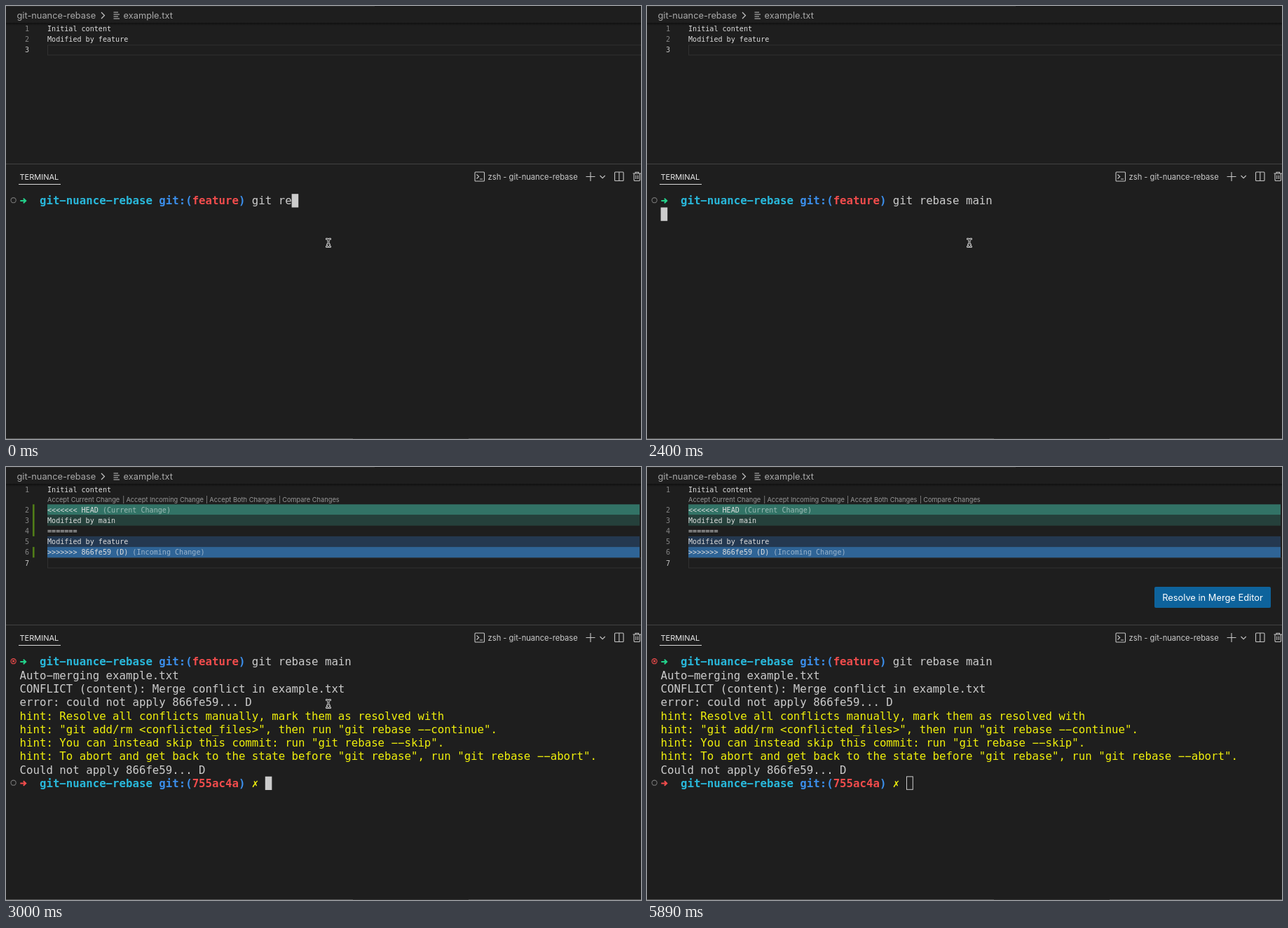
Write an HTML page that moves like this. It is 906 px wide and 618 px high and loops after 5.91 s.

```html
<!DOCTYPE html>
<html lang="en">
<head>
<meta charset="utf-8">
<title>Rebase conflict</title>
<style>
  html, body { margin: 0; width: 100%; height: 100%; overflow: hidden; background: #1e1e1e; }
  svg { display: block; width: 906px; height: 618px; }
  text { white-space: pre; }
  .ui { font-family: Inter, "Liberation Sans", sans-serif; }
  .code { font: 10.08px "DejaVu Sans Mono", monospace; fill: #dcdcdc; }
  .term { font: 15.72px "DejaVu Sans Mono", monospace; fill: #cccccc; }
  .bold { font-weight: bold; }
  .line { fill: none; stroke: #c5c5c5; }
</style>
</head>
<body>
<svg id="stage" viewBox="0 0 906 618">
  <defs>
    <linearGradient id="shade" x2="0" y2="1">
      <stop offset="0" stop-color="#101010"/>
      <stop offset="1" stop-color="#1e1e1e"/>
    </linearGradient>
  </defs>
  <rect width="906" height="618" fill="#1e1e1e"/>
  <rect width="526" height="1" fill="#2b2b2b"/>
  <rect x="526" width="380" height="1" fill="#191919"/>
  <rect y="24" width="906" height="4" fill="url(#shade)"/>

  <g class="ui" font-size="12.8" fill="#a9a9a9">
    <text x="15.5" y="17.8">git-nuance-rebase</text>
    <text x="167.6" y="17.8">example.txt</text>
  </g>
  <path class="line" d="M136 9l4.5 4.5l-4.5 4.5" stroke-width="1.2"/>
  <path class="line" d="M153.5 9h6.5M153.5 12h8.5M153.5 15h6.5M153.5 18h8.5" stroke-width="1.2"/>

  <g id="editor"></g>

  <g id="button">
    <rect x="724" y="171" width="166" height="30" rx="2" fill="#0e639c"/>
    <text class="ui" x="807" y="190.7" font-size="12.85" fill="#fff" text-anchor="middle">Resolve in Merge Editor</text>
  </g>

  <rect y="225" width="906" height="1" fill="#424242"/>
  <text class="ui" x="19.5" y="247.8" font-size="11" fill="#e7e7e7">TERMINAL</text>
  <rect x="18" y="254" width="60" height="1" fill="#d8d8d8"/>
  <text class="ui" x="687.6" y="247.8" font-size="11.15" fill="#cccccc">zsh - git-nuance-rebase</text>
  <g class="line" stroke-width="1.1">
    <rect x="669" y="237" width="13.5" height="13" rx="1"/>
    <path d="M671.5 240.5l3.2 3l-3.2 3M676 247h4"/>
    <path d="M827.5 243.5h13M834 237v13"/>
    <path d="M847.5 242l3.6 3.6l3.6-3.6"/>
    <rect x="868.5" y="237" width="12.5" height="12.5" rx="1"/>
    <path d="M874.8 237v12.5"/>
    <path d="M894.5 239h11.5M898 239v-1.8h4.5v1.8M896 239v9.2q0 1.3 1.3 1.3h5.8q1.3 0 1.3-1.3v-9.2M898.8 241.5v5.5M901.6 241.5v5.5"/>
  </g>

  <g id="terminal"></g>

  <path d="M0 617.5H495M660 617.5H906" stroke="#555"/>
  <path d="M495 617.5H660" stroke="#333"/>

  <g id="mouse" fill="none" stroke-linecap="round">
    <path id="beam" d="M-2.6 -5.5Q0 -5.5 0 -3.5V3.5Q0 5.5 -2.6 5.5M2.6 -5.5Q0 -5.5 0 -3.5M0 3.5Q0 5.5 2.6 5.5M-1.5 2.6H1.5" stroke="#d6d6d6" stroke-width="2.6"/>
    <use href="#beam"/>
    <path d="M-2.6 -5.5Q0 -5.5 0 -3.5V3.5Q0 5.5 -2.6 5.5M2.6 -5.5Q0 -5.5 0 -3.5M0 3.5Q0 5.5 2.6 5.5M-1.5 2.6H1.5" stroke="#161616" stroke-width="0.9"/>
  </g>
</svg>

<script>
const LOOP = 5910;
const COL = 9.464, ROW = 19.28, LEFT = 19.6, TOP = 268.2;
const EDIT_ROW = 15.2, LENS = 13.3;
const CYAN = '#29b8db', BLUE = '#3b8eea', RED = '#f14c4c', GREEN = '#23d18b', YELLOW = '#f0f00c';

const $ = id => document.getElementById(id);

function add(parent, tag, attrs, content) {
  const el = document.createElementNS('http://www.w3.org/2000/svg', tag);
  for (const key in attrs) el.setAttribute(key, attrs[key]);
  if (content) el.textContent = content;
  return parent.appendChild(el);
}
const show = (el, on) => el.setAttribute('visibility', on ? 'visible' : 'hidden');
const box = (parent, x, y, width, height, fill) => add(parent, 'rect', { x, y, width, height, fill });

// Editor
function editorLine(parent, index, y, text, note, active) {
  add(parent, 'text', {
    class: 'code', x: 33.2, y: y + 3.7, 'text-anchor': 'end',
    style: `fill:${active ? '#c6c6c6' : '#858585'}`
  }, String(index + 1));
  const line = add(parent, 'text', { class: 'code', x: 59, y: y + 3.7 }, text);
  if (note) add(line, 'tspan', { style: 'fill:#fff;fill-opacity:.52' }, note);
}

function activeLine(parent, y) {
  add(parent, 'rect', { x: 59.5, y: y - 7, width: 850, height: 14.2, fill: 'none', stroke: '#303030' });
}

function plainFile() {
  const g = add($('editor'), 'g', {});
  activeLine(g, 62.8);
  ['Initial content', 'Modified by feature', ''].forEach((text, i) =>
    editorLine(g, i, 32.3 + i * EDIT_ROW, text, '', i === 2));
  return g;
}

function conflictFile(shift) {
  const g = add($('editor'), 'g', {});
  const rowY = i => 32.3 + i * EDIT_ROW + (i ? shift : 0);
  const lines = [
    ['Initial content'],
    ['<<<<<<< HEAD', ' (Current Change)', '#327366'],
    ['Modified by main', '', '#25403b'],
    ['======='],
    ['Modified by feature', '', '#243850'],
    ['>>>>>>> 866fe59 (D)', ' (Incoming Change)', '#2f6496'],
    ['']
  ];
  activeLine(g, rowY(6));
  lines.forEach(([text, note, fill], i) => {
    if (fill) box(g, 59, rowY(i) - 7.5, 845, EDIT_ROW, fill);
    editorLine(g, i, rowY(i), text, note, i === 6);
  });
  const bars = add(g, 'g', {});
  box(bars, 38, rowY(1) - 7.5, 2.6, EDIT_ROW * 3, '#507d18');
  box(bars, 38, rowY(5) - 7.5, 2.6, EDIT_ROW, '#507d18');
  return { g, bars };
}

function codeLens(parent) {
  const links = [
    [59, 'Accept Current Change'], [166.2, '|'], [171.4, 'Accept Incoming Change'], [285, '|'],
    [290.3, 'Accept Both Changes'], [389, '|'], [394.2, 'Compare Changes']
  ];
  for (const [x, label] of links)
    add(parent, 'text', { class: 'ui', x, y: 50.3, 'font-size': 9.25, fill: '#999' }, label);
}

// Terminal
const termX = col => LEFT + col * COL;
const termY = row => TOP + row * ROW;

function termText(parent, col, row, text, fill, bold) {
  // the wide minus matches the long hyphen of the terminal face
  return add(parent, 'text', {
    class: bold ? 'term bold' : 'term', x: termX(col), y: termY(row) + 15.2,
    style: fill ? `fill:${fill}` : ''
  }, text.replace(/-/g, '\u2212'));
}

function prompt(parent, row, arrow, branch) {
  const y = termY(row) + 9.8;
  add(parent, 'path', {
    d: `M20.3 ${y}H27M24.8 ${y - 3.2}L28.2 ${y}L24.8 ${y + 3.2}`,
    fill: 'none', stroke: arrow, 'stroke-width': 2
  });
  termText(parent, 3, row, 'git-nuance-rebase', CYAN, true);
  termText(parent, 21, row, 'git:(', BLUE, true);
  termText(parent, 26, row, branch, RED, true);
  termText(parent, 33, row, ')', BLUE, true);
}

function marker(parent, row, failed) {
  const y = termY(row) + 9;
  const g = add(parent, 'g', { fill: 'none', stroke: failed ? RED : '#767676', 'stroke-width': 1.1 });
  add(g, 'circle', { cx: 10.6, cy: y, r: 3.6 });
  if (failed) add(g, 'path', { d: `M9.1 ${y - 1.5}l3 3m0 -3l-3 3` });
  return g;
}

const plain = plainFile();
const tight = conflictFile(0);
const spaced = conflictFile(LENS);
codeLens(spaced.g);

const terminal = $('terminal');
prompt(terminal, 0, GREEN, 'feature');
const command = termText(terminal, 35, 0, 'git re');
const idle = marker(terminal, 0, false);
const failed = marker(terminal, 0, true);

const output = add(terminal, 'g', {});
[
  'Auto-merging example.txt',
  'CONFLICT (content): Merge conflict in example.txt',
  'error: could not apply 866fe59... D',
  'hint: Resolve all conflicts manually, mark them as resolved with',
  'hint: "git add/rm <conflicted_files>", then run "git rebase --continue".',
  'hint: You can instead skip this commit: run "git rebase --skip".',
  'hint: To abort and get back to the state before "git rebase", run "git rebase --abort".',
  'Could not apply 866fe59... D'
].forEach((text, i) => termText(output, 0, i + 1, text, text.startsWith('hint') ? YELLOW : ''));

const nextPrompt = add(terminal, 'g', {});
prompt(nextPrompt, 9, RED, '755ac4a');
termText(nextPrompt, 35, 9, '✗', YELLOW, true);
marker(nextPrompt, 9, false);

const block = box(terminal, 0, 0, 9.6, 19.3, '#cccccc');
const hollow = add(terminal, 'rect', {
  x: 370.5, y: 441.9, width: 8.8, height: 18.4, fill: 'none', stroke: '#cccccc'
});

// Timing
const TYPED = 'git rebase main';
const KEYS = [270, 450, 710, 860, 1040, 1490, 1570, 1780, 1870];
const ENTER = 2400, OUTPUT = 2460, PROMPT = 2580, CONFLICT = 2670, BARS = 2760;
const LENSES = 3000, BUTTON = 3750, BARS_OFF = 4010, BLUR = 5890;
const MOUSE = [
  [0, 460, 338], [4730, 585, 393], [4820, 640, 413], [4910, 690, 436], [5000, 735, 462],
  [5080, 775, 492], [5170, 812, 529], [5260, 845, 568], [5350, 887, 612]
];
const MOUSE_GONE = 5430;

function cursorCell(t, typed) {
  if (t < ENTER) return [35 + typed, 0];
  if (t < OUTPUT) return [0, 1];
  return t < PROMPT ? [0, 9] : [37, 9];
}

function draw(t) {
  const typed = 6 + KEYS.filter(k => t >= k).length;
  command.textContent = TYPED.slice(0, typed);

  const [col, row] = cursorCell(t, typed);
  block.setAttribute('x', termX(col));
  block.setAttribute('y', termY(row));
  show(block, t < BLUR);
  show(hollow, t >= BLUR);

  show(output, t >= OUTPUT);
  show(nextPrompt, t >= PROMPT);
  show(idle, t < PROMPT);
  show(failed, t >= PROMPT);

  show(plain, t < CONFLICT);
  show(tight.g, t >= CONFLICT && t < LENSES);
  show(tight.bars, t >= BARS && t < LENSES);
  show(spaced.g, t >= LENSES);
  show(spaced.bars, t >= LENSES && t < BARS_OFF);
  show($('button'), t >= BUTTON);

  const [, x, y] = MOUSE.filter(m => t >= m[0]).pop();
  $('mouse').setAttribute('transform', `translate(${x} ${y})`);
  show($('mouse'), t < MOUSE_GONE);
}

const start = performance.now();
function tick() {
  draw((performance.now() - start) % LOOP);
  requestAnimationFrame(tick);
}
tick();
</script>
</body>
</html>
```
